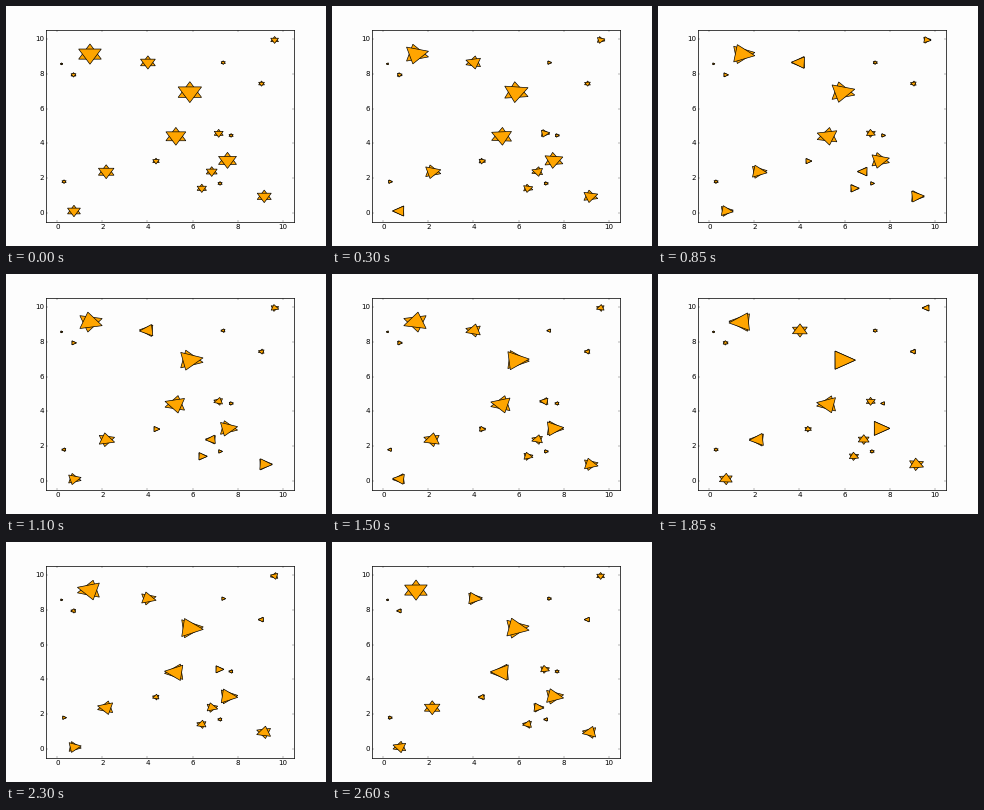
Write a matplotlib script that moves like this. It is 320 px wide and 240 px high and loops after 2.65 s.

```python
import numpy as np
import matplotlib.pyplot as plt
from matplotlib.animation import FuncAnimation
from matplotlib.patches import RegularPolygon

FRAMES, INTERVAL = 53, 50
PAPER = "#fdfdfd"

# Turn per step in degrees, then x, y and radius of the stars that share it
STARS = {
    -0.8: [(5.88, 6.94, 0.60), (7.55, 3.03, 0.46)],
    -1.5: [(0.72, 7.93, 0.13), (4.38, 2.99, 0.17), (7.22, 1.71, 0.11),
           (6.41, 1.43, 0.24), (9.18, 0.97, 0.36)],
    -2.3: [(1.45, 9.12, 0.58), (2.17, 2.38, 0.40), (9.64, 9.93, 0.20),
           (7.71, 4.46, 0.11)],
    -3.3: [(7.36, 8.63, 0.11), (7.16, 4.58, 0.23), (0.30, 1.81, 0.11)],
    0.5: [(5.26, 4.41, 0.51), (9.06, 7.43, 0.15)],
    1.6: [(4.02, 8.64, 0.38), (6.85, 2.39, 0.28)],
    4.8: [(0.74, 0.13, 0.33), (0.19, 8.56, 0.06)],
}

plt.style.use("classic")
plt.rcParams.update({
    "font.family": "DejaVu Sans",
    "axes.facecolor": PAPER,
    "axes.linewidth": 1.3,
    "xtick.labelsize": 12.8,
    "ytick.labelsize": 12.8,
})

fig, ax = plt.subplots(figsize=(8, 6), dpi=40, facecolor=PAPER)
ax.set_xlim(-0.5, 10.5)
ax.set_ylim(-0.5, 10.5)


def triangle(x, y, radius):
    patch = RegularPolygon((x, y), 3, radius=radius, facecolor="orange",
                           edgecolor="black", linewidth=1.2)
    return ax.add_patch(patch)


# Every star is a pair of triangles, one pointing up and one pointing down
stars = [(np.radians(rate), triangle(*spot), triangle(*spot))
         for rate, spots in STARS.items() for spot in spots]


def update(step):
    """Turn the two triangles of every star in opposite directions."""
    for rate, up, down in stars:
        up.orientation = -rate * step
        down.orientation = np.pi + rate * step


anim = FuncAnimation(fig, update, frames=FRAMES, interval=INTERVAL,
                     init_func=lambda: update(0), repeat=True)
plt.show()
```
